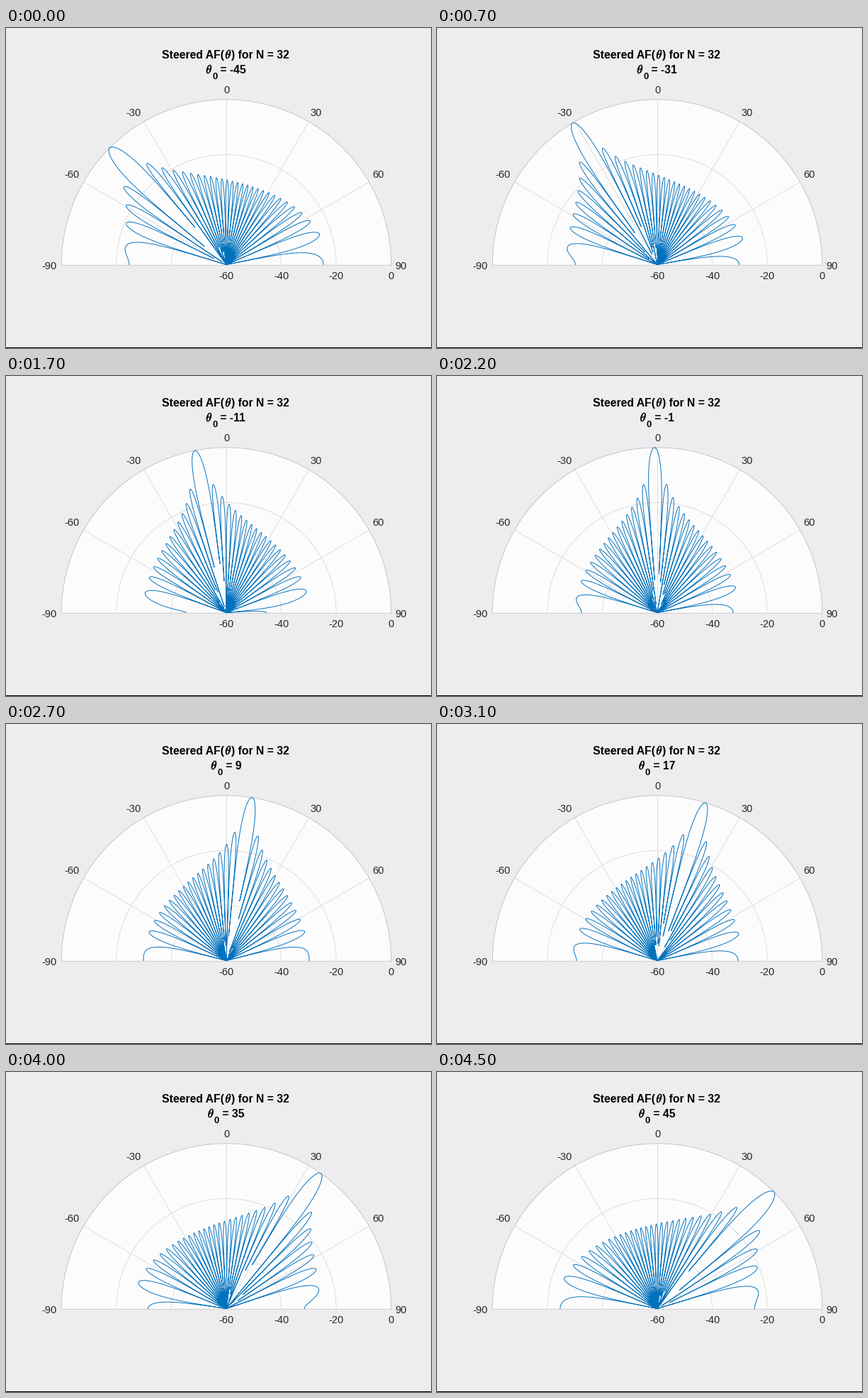
Write a matplotlib script that moves like this. It is 600 px wide and 451 px high and loops after 4600 ms.

```python
import numpy as np
import matplotlib.pyplot as plt
from matplotlib.animation import FuncAnimation
from matplotlib.patches import Rectangle, Wedge
from matplotlib.patheffects import withStroke

W, H, DPI = 600, 451, 64
PX = 72 / DPI                      # points per pixel
CX, CY, R = 311, 333.5, 232.7      # polar origin and outer radius
N = 32                             # array elements
FLOOR = 60                         # dB range of the radial axis
FRAMES = 46
TITLE = 15.8                       # title size in pixels
THETA_W = 9

plt.rcParams["font.family"] = "Liberation Sans"
plt.rcParams["mathtext.fontset"] = "cm"

fig = plt.figure(figsize=(W / DPI, H / DPI), dpi=DPI, facecolor="#eeecee")
ax = fig.add_axes([0, 0, 1, 1])
ax.set(xlim=(0, W), ylim=(H, 0))
ax.axis("off")


def polar(deg, r):
    t = np.radians(deg)
    return CX + r * np.sin(t), CY - r * np.cos(t)


def stroke(x, y, color, width=1, z=2):
    return ax.plot(x, y, color=color, lw=width * PX, zorder=z)[0]


def label(x, y, s, size=14.6, color="#262626", **kw):
    kw.setdefault("ha", "center")
    return ax.text(x, y, s, fontsize=size * PX, color=color,
                   va="baseline", **kw)


def bold(x, y, s, size=TITLE):
    return label(x, y, s, size, "black", ha="left", weight="bold")


def theta_sign(x, y):
    return label(x, y, r"$\theta$", 17, "black", ha="left",
                 path_effects=[withStroke(linewidth=0.5, foreground="black")])


def array_factor(theta, steer):
    """Normalised magnitude of a half-wavelength spaced uniform array."""
    half = np.pi / 2 * (np.sin(np.radians(theta)) - np.sin(np.radians(steer)))
    den = N * np.sin(half)
    peak = np.abs(den) < 1e-9
    return np.where(peak, 1, np.abs(np.sin(N * half) / np.where(peak, 1, den)))


# Polar grid
ax.add_patch(Wedge((CX, CY), R, 180, 360, fc="#fdfcfd", ec="none", zorder=1))
arc = np.linspace(-90, 90, 361)
for db in (20, 40):
    stroke(*polar(arc, R * db / FLOOR), "#dfdedf")
for deg in range(-60, 61, 30):
    stroke(*polar(deg, np.array([0, R])), "#dfdedf")
stroke(*polar(arc, R), "#c8c7c8")
stroke([CX - R, CX + R], [CY, CY], "#d2d1d2")

# Tick labels
for x, y, s in [(311, 92, "0"), (180, 123.5, "-30"), (438, 123.5, "30"),
                (93, 211, "-60"), (525, 211, "60"),
                (61, 339.5, "-90"), (557.5, 339.5, "90")]:
    label(x, y, s)
for k in range(4):
    label(CX + k * R / 3, 353.5, str(20 * k - FLOOR))

# Title
bold(220.5, 43, "Steered AF(")
theta_sign(309.3, 43)
bold(318.3, 43, ") for N = 32")
symbol = theta_sign(0, 64)
sub = bold(0, 72, "0", 13)
value = bold(0, 64, "")

ax.add_patch(Rectangle((0, H - 1), W, 1, fc="black", ec="none"))

angles = np.linspace(-90, 90, 1801)
beam = stroke([], [], "#0072bd", 0.95, 3)


def update(i):
    steer = 2 * i - 45
    db = 20 * np.log10(np.maximum(array_factor(angles, steer), 1e-3))
    beam.set_data(*polar(angles, R * (1 + db / FLOOR)))

    # Centre the second title line from the glyph advances
    digits = len(str(abs(steer)))
    ems = 1.14 + 0.556 * digits + 0.333 * (steer < 0)
    sub_w = 0.556 * 13
    x = 310.8 - (THETA_W + sub_w + ems * TITLE) / 2
    symbol.set_x(x)
    sub.set_x(x + THETA_W)
    value.set_x(x + THETA_W + sub_w)
    value.set_text(f" = {steer}")
    return beam, symbol, sub, value


anim = FuncAnimation(fig, update, frames=FRAMES, interval=100,
                     repeat=True, repeat_delay=0, blit=False)
plt.show()
```
